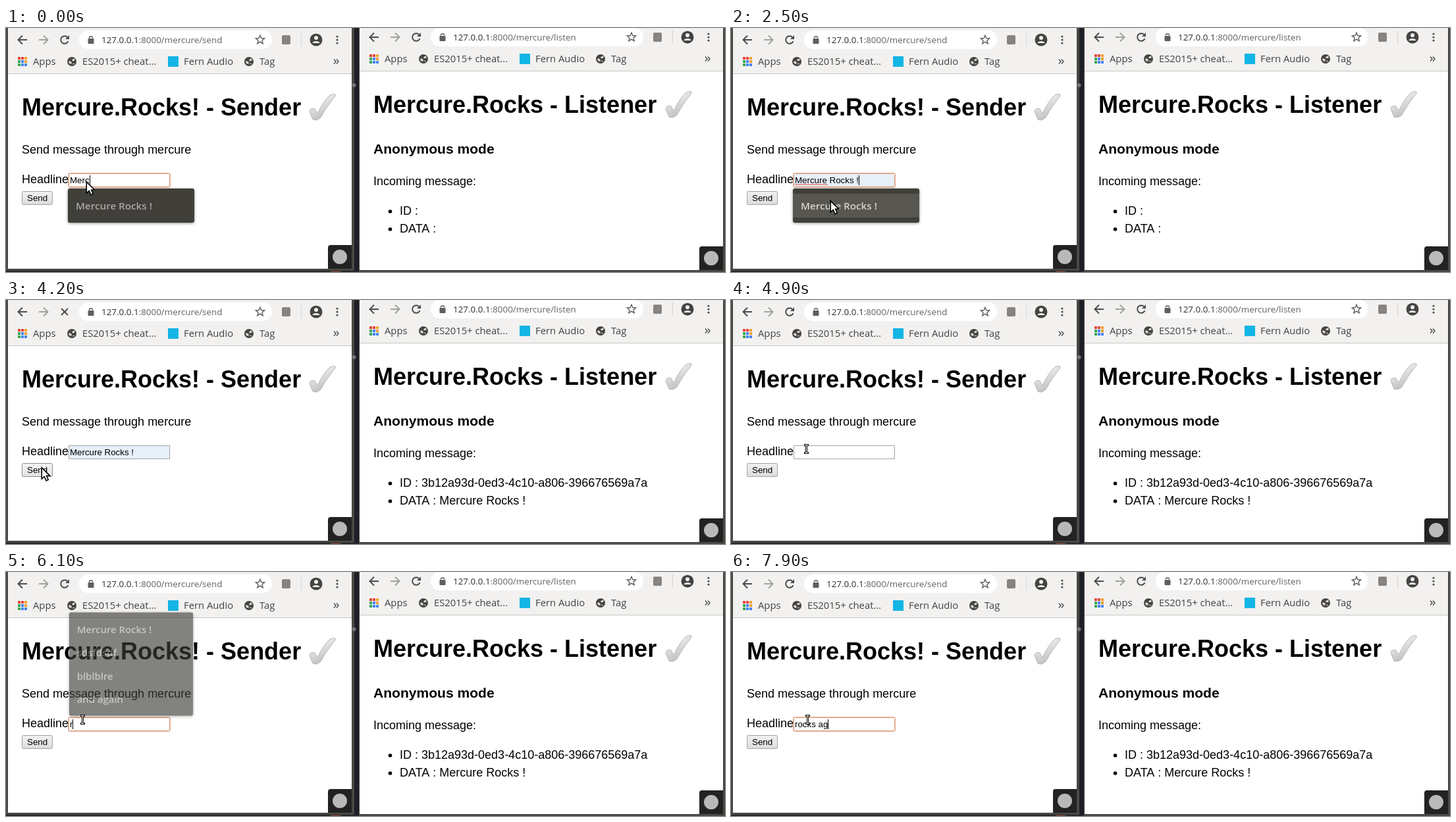
An HTML page with a canvas that plays this animation: 1092 by 371 pixels, repeating every 8 s.

```html
<!DOCTYPE html>
<html lang="en">
<head>
<meta charset="utf-8">
<title>Sender and listener</title>
<style>
html, body { margin: 0; width: 100%; height: 100%; overflow: hidden; background: #3c3b37; }
canvas { display: block; }
</style>
</head>
<body>
<canvas id="stage" width="1092" height="371"></canvas>
<script>
const screen2d = document.getElementById('stage').getContext('2d');
const layer = document.createElement('canvas');
layer.width = 1092;
layer.height = 371;
const layer2d = layer.getContext('2d');
let ctx = screen2d;

const LOOP = 8000;
const PAGE = '"Liberation Sans", Arial, sans-serif';
const UI = '"Open Sans", "Noto Sans", sans-serif';
const INK = '#4d4c4a';

// Pointer path: time, x, y
const path = [
  [0, 122, 234], [1900, 122, 234], [2100, 125, 237], [2300, 150, 266], [2400, 150, 266],
  [2700, 154, 256], [2900, 154, 256], [3100, 50, 271], [3200, 8, 268], [3300, 38, 258],
  [3400, 38, 258], [3500, 54, 255], [4500, 54, 255], [4800, 110, 228], [5000, 118, 224],
  [5300, 118, 224], [5400, 144, 234], [5500, 116, 224], [8000, 116, 224]
];

// Field content from each time on
const typed = [
  [0, 'Merc'], [100, 'Mercu'], [300, 'Mercur'], [500, 'Mercure'], [2200, 'Mercure Rocks !'],
  [4300, ''], [6000, 'r'], [6200, 'ro'], [6400, 'roc'], [6600, 'rock'], [6900, 'rocks'],
  [7000, 'rocks '], [7700, 'rocks a'], [7900, 'rocks ag']
];

const caretOff = [[1000, 1600], [2200, 2500], [3200, 3700], [4100, 5000], [5700, 6000], [7500, 7700]];
const within = (t, a, b) => t >= a && t < b;

function at(keys, t) {
  let value = keys[0];
  for (const k of keys) if (t >= k[0]) value = k;
  return value[1];
}

function pointerAt(t) {
  let i = 0;
  while (i < path.length - 2 && t >= path[i + 1][0]) i++;
  const [t0, x0, y0] = path[i], [t1, x1, y1] = path[i + 1];
  const k = (t - t0) / (t1 - t0);
  return [Math.round(x0 + (x1 - x0) * k), Math.round(y0 + (y1 - y0) * k)];
}

function rect(x, y, w, h, color) {
  ctx.fillStyle = color;
  ctx.fillRect(x, y, w, h);
}

function round(x, y, w, h, r, color) {
  ctx.fillStyle = color;
  ctx.beginPath();
  ctx.roundRect(x, y, w, h, r);
  ctx.fill();
}

function frame(x, y, w, h, r, color) {
  ctx.strokeStyle = color;
  ctx.lineWidth = 1;
  ctx.beginPath();
  ctx.roundRect(x + .5, y + .5, w - 1, h - 1, r);
  ctx.stroke();
}

function disc(x, y, r, color) {
  ctx.fillStyle = color;
  ctx.beginPath();
  ctx.arc(x, y, r, 0, 7);
  ctx.fill();
}

function line(points, color, width = 2, close = false) {
  ctx.beginPath();
  points.forEach(([x, y]) => ctx.lineTo(x, y));
  if (close) ctx.closePath();
  ctx.strokeStyle = color;
  ctx.lineWidth = width;
  ctx.stroke();
}

function text(s, x, y, font, color = '#000') {
  ctx.font = font;
  ctx.fillStyle = color;
  ctx.fillText(s, x, y);
  return ctx.measureText(s).width;
}

const page = (s, x, y, size = 18, weight = 400) => text(s, x, y, `${weight} ${size}px ${PAGE}`);

function arrow(x, y, dir, color) {
  line([[x - 7 * dir, y], [x + 6 * dir, y]], color);
  line([[x, y - 6.5], [x + 6.5 * dir, y], [x, y + 6.5]], color);
}

function reload(x, y) {
  ctx.beginPath();
  ctx.arc(x, y, 5.8, .35, 5.5);
  ctx.strokeStyle = INK;
  ctx.lineWidth = 2;
  ctx.stroke();
  ctx.fillStyle = INK;
  ctx.beginPath();
  ctx.moveTo(x + 7, y - 7);
  ctx.lineTo(x + 7, y - 1);
  ctx.lineTo(x + 1, y - 1);
  ctx.fill();
}

function stop(x, y) {
  line([[x - 5, y - 5], [x + 5, y + 5]], INK);
  line([[x + 5, y - 5], [x - 5, y + 5]], INK);
}

function star(x, y) {
  const pts = Array.from({ length: 10 }, (_, i) => {
    const r = i % 2 ? 3.1 : 7, a = i * Math.PI / 5 - Math.PI / 2;
    return [x + r * Math.cos(a), y + r * Math.sin(a)];
  });
  line(pts, '#5f5e5c', 1.4, true);
}

function lock(x, y) {
  round(x - 4.5, y - 2, 9, 8, 1, '#5f5e5c');
  ctx.beginPath();
  ctx.arc(x, y - 2.5, 2.7, Math.PI, 0);
  ctx.strokeStyle = '#5f5e5c';
  ctx.lineWidth = 1.4;
  ctx.stroke();
}

function globe(x, y) {
  disc(x, y, 7, '#454442');
  ctx.fillStyle = '#dedcda';
  ctx.beginPath();
  ctx.ellipse(x - 2.5, y + 1.5, 2.6, 1.7, .6, 0, 7);
  ctx.ellipse(x + 2.5, y - 2.5, 2.4, 1.5, -.3, 0, 7);
  ctx.fill();
  rect(x + 1, y + 3, 3, 1, '#dedcda');
}

function apps(x, y) {
  const colors = ['#e8453c', '#e8453c', '#f0a030', '#35a853', '#4285f4', '#f0a030', '#35a853', '#4285f4', '#4285f4'];
  colors.forEach((c, i) => rect(x + i % 3 * 5, y + Math.floor(i / 3) * 5, 4, 4, c));
}

function profile(x, y) {
  disc(x, y, 9.5, '#454442');
  disc(x, y - 3, 3, '#f2f1f0');
  ctx.fillStyle = '#f2f1f0';
  ctx.beginPath();
  ctx.ellipse(x, y + 5, 5.6, 3, 0, Math.PI, 0);
  ctx.fill();
}

// Toolbar; dx, dy move the left group, rx the right group
function toolbar(dx, dy, rx, route, loading) {
  ctx.save();
  ctx.translate(dx, dy);
  arrow(25, 18, -1, INK);
  arrow(57, 18, 1, '#a3a19e');
  (loading ? stop : reload)(89, 18);
  round(111, 4, 293 + rx - dx, 28, 14, '#fff');
  lock(129, 18);
  const url = `13.4px ${UI}`;
  const w = text('127.0.0.1', 145, 23, url, '#2e2e2e');
  text(':8000/mercure/' + route, 145 + w, 23, url, '#626160');
  apps(18, 44);
  const label = (s, x) => text(s, x, 56, `14.8px ${UI}`, '#434240');
  label('Apps', 41);
  globe(100, 51);
  label('ES2015+ cheat…', 116);
  rect(246, 43, 16, 16, '#14b4e4');
  label('Fern Audio', 270);
  globe(369, 51);
  label('Tag', 385);
  ctx.translate(rx - dx, 0);
  star(386, 18);
  round(419, 11, 13, 14, 2, '#858482');
  rect(448, 8, 1, 20, '#d4d2cf');
  profile(471, 18);
  for (let i = -1; i < 2; i++) disc(503, 18 + i * 5, 1.6, INK);
  for (const x of [498, 502]) line([[x, 47.5], [x + 3, 51], [x, 54.5]], INK, 1.4);
  ctx.restore();
}

function check(x, y) {
  ctx.save();
  ctx.translate(x, y);
  const g = ctx.createLinearGradient(14, 8, 26, 34);
  g.addColorStop(0, '#ececec');
  g.addColorStop(1, '#c2c2c2');
  ctx.beginPath();
  ctx.moveTo(1, 26);
  ctx.quadraticCurveTo(3, 21, 9, 23);
  ctx.lineTo(13, 30);
  ctx.quadraticCurveTo(22, 11, 32, 2);
  ctx.quadraticCurveTo(36, 0, 40, 1);
  ctx.quadraticCurveTo(41, 3, 38, 6);
  ctx.quadraticCurveTo(28, 18, 18, 36);
  ctx.quadraticCurveTo(12, 42, 6, 39);
  ctx.quadraticCurveTo(3, 33, 1, 26);
  ctx.fillStyle = g;
  ctx.fill();
  ctx.strokeStyle = '#b8b8b8';
  ctx.lineWidth = 1;
  ctx.stroke();
  ctx.restore();
}

function badge(x, y) {
  round(x, y, 36, 36, [4, 0, 0, 0], '#222');
  disc(x + 18, y + 18, 11, '#b9b9b9');
}

function field(t) {
  const focus = !within(t, 4100, 5000), filled = within(t, 2200, 4300);
  rect(95, 221, 154, 21, filled ? '#e8f0fa' : '#fff');
  if (focus) {
    frame(94, 220, 156, 23, 2, '#e8b89f');
    frame(95, 221, 154, 21, 1, '#dd9d7e');
  } else frame(95, 221, 154, 21, 0, '#a3a3a3');
  const value = at(typed, t);
  const w = page(value, 97, 236, 13.333);
  if (within(t, 1600, 4100)) {
    const wave = Array.from({ length: 26 }, (_, i) => [97 + i * 2, i % 2 ? 239 : 237]);
    line(wave, '#d8453c', 1);
  }
  if (!caretOff.some(([a, b]) => within(t, a, b))) rect(Math.round(97 + w), 224, 1, 15, '#000');
}

function button(t) {
  const hover = within(t, 3300, 4700);
  const g = ctx.createLinearGradient(0, 248, 0, 269);
  g.addColorStop(0, hover ? '#f4f4f4' : '#f1f1f1');
  g.addColorStop(1, hover ? '#e2e2e2' : '#dcdcdc');
  round(24, 248, 47, 21, 2, g);
  frame(24, 248, 47, 21, 2, hover ? '#8e8e8e' : '#a3a3a3');
  page('Send', 32, 263, 13.333);
}

// Painted on a layer first, so that panel and text fade as one
function popup(y, items, fading, hover) {
  const h = items.length * 36 + 16;
  ctx = layer2d;
  ctx.clearRect(0, 0, 1092, 371);
  ctx.save();
  if (fading) {
    ctx.translate(190, y + h / 2);
    ctx.scale(.98, .98);
    ctx.translate(-190, -y - h / 2);
  }
  ctx.shadowColor = 'rgba(0,0,0,.45)';
  ctx.shadowBlur = 4;
  ctx.shadowOffsetY = 1;
  round(94, y, 192, h, 3, '#3d3c37');
  ctx.shadowColor = 'transparent';
  if (hover) rect(94, y + 8, 192, 36, '#55544e');
  items.forEach((s, i) => text(s, 106, y + 32 + i * 36, `600 15.2px ${UI}`, hover ? '#d6d3ce' : '#aaa7a2'));
  ctx.restore();
  ctx = screen2d;
  ctx.globalAlpha = fading ? .64 : .985;
  ctx.drawImage(layer, 0, 0);
  ctx.globalAlpha = 1;
}

function popups(t) {
  const first = 'Mercure Rocks !';
  if (t < 2700) popup(244, [first], t >= 2600, within(t, 2200, 2600));
  if (within(t, 5100, 6200)) {
    popup(60, [first, 'sdsfdsdf', 'blblblre', 'and again'], !within(t, 5200, 6100), false);
  }
}

function pointer(t) {
  const [x, y] = pointerAt(t);
  if (t >= 4700) {
    const bars = [[-2, -6, 5, 1], [0, -6, 1, 13], [-2, 6, 5, 1]];
    for (const [a, b, w, h] of bars) rect(x + a - 1, y + b - 1, w + 2, h + 2, '#000');
    for (const [a, b, w, h] of bars) rect(x + a, y + b, w, h, '#fff');
    return;
  }
  const shape = [[0, 0], [0, 16], [3.8, 12.6], [6.6, 19], [9.4, 17.8], [6.7, 11.6], [11.5, 11.3]];
  const pts = shape.map(([a, b]) => [x + a + .5, y + b + .5]);
  line(pts, '#000', 2, true);
  ctx.fillStyle = '#fff';
  ctx.fill();
  line(pts, '#000', 1.1, true);
}

function sender(t) {
  rect(3, 0, 522, 366, '#fff');
  rect(3, 0, 522, 69, '#f2f1f0');
  rect(3, 69, 522, 1, '#c9c6c3');
  toolbar(0, 0, 0, 'send', within(t, 4100, 4300));
  page('Mercure.Rocks! - Sender', 24, 133, 36, 700);
  check(460, 100);
  page('Send message through mercure', 24, 191);
  page('Headline', 24, 236);
  field(t);
  button(t);
  badge(489, 330);
}

function listener(t) {
  rect(537, 0, 552, 368, '#fff');
  rect(537, 0, 552, 65, '#f2f1f0');
  rect(537, 65, 552, 1, '#c9c6c3');
  toolbar(534, -4, 564, 'listen', false);
  page('Mercure.Rocks - Listener', 558, 129, 36, 700);
  check(1001, 96);
  page('Anonymous mode', 558, 191, 21.06, 700);
  page('Incoming message:', 558, 239);
  const got = t >= 4200;
  disc(583.5, 279, 2.8, '#000');
  disc(583.5, 306, 2.8, '#000');
  page('ID :' + (got ? ' 3b12a93d-0ed3-4c10-a806-396676569a7a' : ''), 598, 284);
  page('DATA :' + (got ? ' Mercure Rocks !' : ''), 598, 311);
  badge(1053, 332);
}

function draw(t) {
  rect(0, 0, 1092, 371, '#4a4843');
  rect(529, 0, 7, 371, '#1d2027');
  disc(528.5, 87, 3, '#74777d');
  rect(0, 369, 536, 2, '#23252a');
  rect(493, 370, 15, 1, '#a0563a');
  listener(t);
  sender(t);
  popups(t);
  pointer(t);
}

const start = performance.now();
function tick() {
  const t = (performance.now() - start) % LOOP;
  draw(Math.floor(t / 100) * 100);
  requestAnimationFrame(tick);
}
tick();
</script>
</body>
</html>
```
